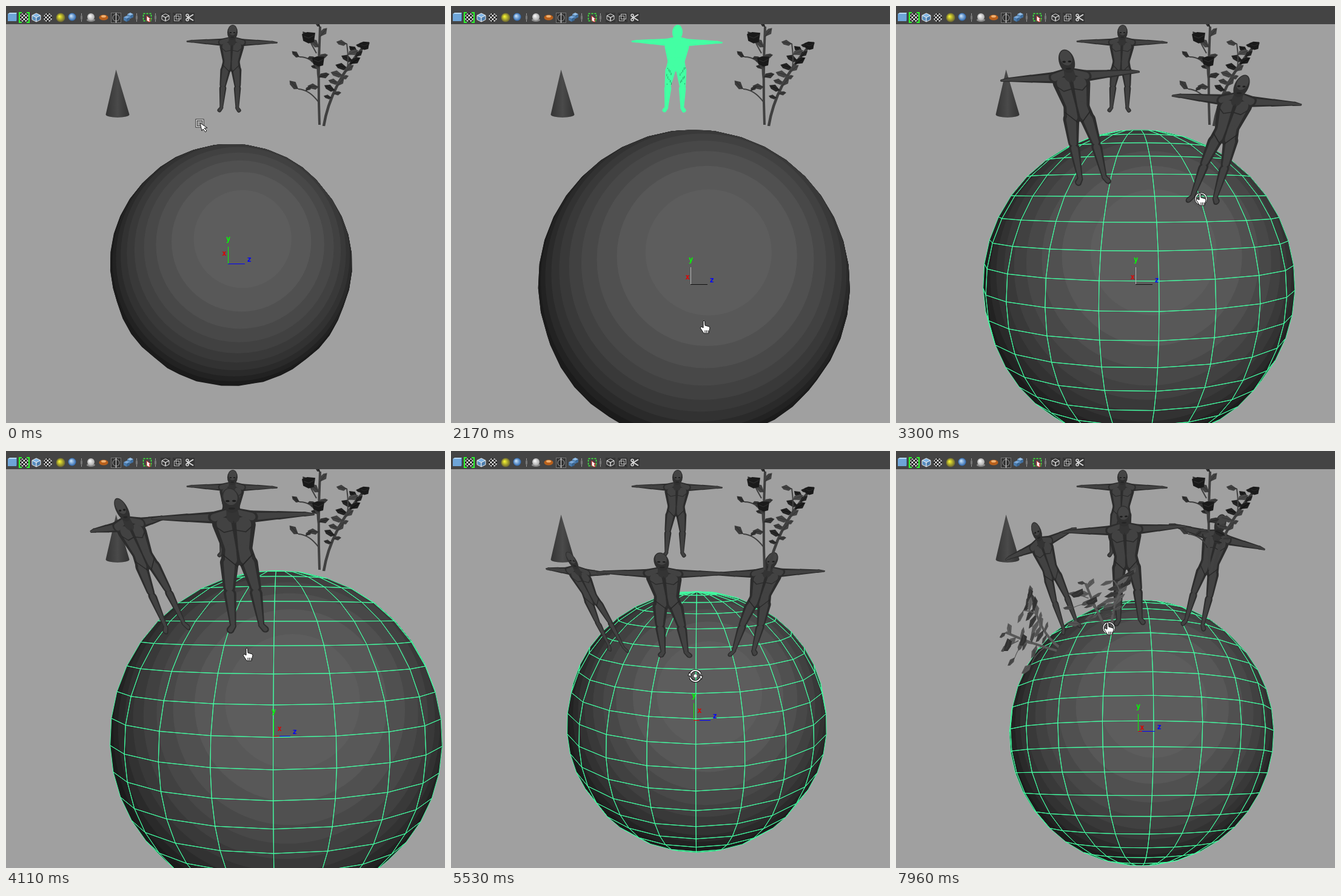
Recreate the animation shown at these times as an HTML page with a canvas. Size 724 by 688 pixels, loop 8 s.

```html
<!DOCTYPE html>
<html lang="en">
<head>
<meta charset="utf-8">
<title>Placing models on a sphere</title>
<style>
html, body { margin: 0; width: 100%; height: 100%; overflow: hidden; background: #a0a0a0; }
canvas { display: block; }
</style>
</head>
<body>
<canvas id="stage" width="724" height="688"></canvas>
<script>
const ctx = document.getElementById('stage').getContext('2d');
const LOOP = 8000, TAU = Math.PI * 2, RAD = Math.PI / 180;
const GREEN = '#43ffa3';

// ---------- story ----------
// Each view is reached by orbiting between start and end.
const VIEWS = [
  { start: -1, end: 0, x: 371, y: 427.5, radius: 200, tilt: 18, yaw: 8 },
  { start: 1620, end: 2150, x: 400, y: 462, radius: 258, tilt: 7.6, yaw: 6.1 },
  { start: 3480, end: 4060, x: 446, y: 472.5, radius: 275.5, tilt: 9, yaw: -18.9 },
  { start: 5130, end: 5520, x: 405.5, y: 447, radius: 215.5, tilt: 16.9, yaw: -18.4 },
  { start: 5520, end: 6200, x: 404, y: 465, radius: 219, tilt: -4.2, yaw: -13.6 }
];
// Each model is dragged over the sphere to lon/lat, starting off by `from`.
const LEFT = { start: 2250, end: 2760, lon: -25, lat: 41, from: [-20, -30] };
const MIDDLE = { start: 2960, end: 3440, lon: 8, lat: 41, from: [50, -36] };
const RIGHT = { start: 4550, end: 5000, lon: 41, lat: 41, from: [20, -36] };
const SPROUTS = [
  { start: 7100, end: 7500, lon: -27, lat: 31, from: [10, -25] },
  { start: 7680, end: 7940, lon: -1, lat: 37, from: [20, -25] }
];
const DRAGS = [LEFT, MIDDLE, RIGHT, ...SPROUTS];
const RESTS = [
  [0, 320, 193], [90, 320, 193], [300, 372, 100], [560, 578, 282], [840, 470, 270], [2170, 417, 519],
  [4110, 397, 325], [4400, 560, 600], [5530, 403, 371], [6380, 520, 160], [6640, 449, 292]
];

const within = (t, ...spans) => spans.some(([a, b]) => t >= a && t < b);
const mix = (a, b, p) => a + (b - a) * p;
function ease(t, start, end) {
  const p = Math.min(1, Math.max(0, (t - start) / (end - start)));
  return p * p * (3 - 2 * p);
}

// ---------- camera ----------
function cameraAt(t) {
  const cam = { ...VIEWS[0] };
  for (const view of VIEWS) {
    const p = ease(t, view.start, view.end);
    for (const key in cam) cam[key] = mix(cam[key], view[key], p);
  }
  return cam;
}
function project(cam, x, y, z) {
  const distance = 4.63, sin = Math.sin(cam.tilt * RAD), cos = Math.cos(cam.tilt * RAD);
  const scale = cam.radius * Math.sqrt(distance ** 2 - 1) / (distance - y * sin - z * cos);
  return [cam.x + x * scale, cam.y - (y * cos - z * sin) * scale];
}
function normalAt(lon, lat) {
  const l = lon * RAD, b = lat * RAD;
  return [Math.sin(l) * Math.cos(b), Math.sin(b), Math.cos(l) * Math.cos(b)];
}
function spotAt(item, cam, t) {
  const left = 1 - ease(t, item.start, item.end);
  return [item.lon + item.from[0] * left + cam.yaw, item.lat + item.from[1] * left];
}
function footAt(item, t) {
  const cam = cameraAt(t);
  return project(cam, ...normalAt(...spotAt(item, cam, t)));
}

const grip = (item, t) => footAt(item, t).map((v, i) => v - [4, 16][i]);
const PATH = [...RESTS, ...DRAGS.flatMap(d => [d.start, d.end].map(t => [t, ...grip(d, t)]))]
  .sort((a, b) => a[0] - b[0]);
function pointerAt(t) {
  const held = DRAGS.find(d => within(t, [d.start, d.end]));
  if (held) return grip(held, t);
  const i = PATH.findIndex(k => k[0] > t);
  if (i < 0) return PATH[PATH.length - 1].slice(1);
  const [a, b] = [PATH[i - 1], PATH[i]], p = ease(t, a[0], b[0]);
  return [mix(a[1], b[1], p), mix(a[2], b[2], p)];
}

// ---------- drawing helpers ----------
function poly(points, fill, stroke, width = 1, closed = true) {
  ctx.beginPath();
  points.forEach(([x, y]) => ctx.lineTo(x, y));
  if (closed) ctx.closePath();
  if (fill) { ctx.fillStyle = fill; ctx.fill(); }
  if (stroke) { ctx.strokeStyle = stroke; ctx.lineWidth = width; ctx.stroke(); }
}
const line = (color, width, ...points) => poly(points, null, color, width, false);
function oval(x, y, rx, ry, fill) {
  ctx.beginPath();
  ctx.ellipse(x, y, rx, ry, 0, 0, TAU);
  ctx.fillStyle = fill;
  ctx.fill();
}
function ring(x, y, r, color, width, from = 0, to = TAU) {
  ctx.beginPath();
  ctx.arc(x, y, r, from, to);
  ctx.strokeStyle = color;
  ctx.lineWidth = width;
  ctx.stroke();
}
function rect(x, y, w, h, fill) {
  ctx.fillStyle = fill;
  ctx.fillRect(x, y, w, h);
}
function frame(x, y, w, h, color, width = 1) {
  ctx.strokeStyle = color;
  ctx.lineWidth = width;
  ctx.strokeRect(x, y, w, h);
}
function placed(matrix, draw) {
  ctx.save();
  ctx.transform(...matrix);
  draw();
  ctx.restore();
}
function tapered(x1, y1, r1, x2, y2, r2, color) {
  const a = Math.atan2(y2 - y1, x2 - x1);
  ctx.beginPath();
  ctx.arc(x1, y1, r1, a + Math.PI / 2, a - Math.PI / 2);
  ctx.arc(x2, y2, r2, a - Math.PI / 2, a + Math.PI / 2);
  ctx.closePath();
  ctx.fillStyle = color;
  ctx.fill();
}
function seeded(seed) {
  return () => (seed = seed * 16807 % 2147483647) / 2147483647;
}

// ---------- man: mirrored tapered limbs, 143 units tall, arms 148 wide ----------
const ARM = [[17, 114, 6, 42, 114.5, 4], [42, 114.5, 4.2, 66, 115, 2.2], [66, 115, 2.4, 74, 114.5, 1.2]];
const TRUNK = [
  [4, 119, 4, 17, 114, 6], [9, 107, 11, 6, 83, 8], [6, 82, 8, 7, 72, 9],
  [9, 68, 8.5, 12, 44, 5.5], [12, 38, 5.8, 13, 8, 3], [13, 6, 3, 16, 2, 3.5]
];

function limbs(list, selected) {
  for (const [color, share] of selected ? [[GREEN, 1]] : [['#2d2d2d', 1], ['#424242', .62]]) {
    for (const side of [-1, 1]) {
      for (const [x1, y1, r1, x2, y2, r2] of list) {
        tapered(side * x1, y1, r1 * share, side * x2, y2, r2 * share, color);
      }
    }
  }
}
function man([fx, fy], [ux, uy], [ax, ay], selected) {
  // the trunk keeps some depth when the arms are foreshortened
  const deep = Math.max(1, .72 * Math.hypot(ux, uy) / Math.hypot(ax, ay));
  const up = [ux / 143, uy / 143, fx, fy];
  placed([ax / 148, ay / 148, ...up], () => limbs(ARM, selected));
  placed([ax / 148 * deep, ay / 148 * deep, ...up], () => {
    limbs(TRUNK, selected);
    tapered(0, 114, 6, 0, 124, 5, selected ? GREEN : '#343434');
    oval(0, 130.5, 8.5, 12.5, selected ? GREEN : '#303030');
    if (selected) {
      for (let i = 0; i < 34; i++) rect((i % 2 ? 1 : -1) * (7 + i * 7 % 9), 44 + i * 11 % 28, .8, 1.6, '#1d6b46');
      return;
    }
    oval(0, 134, 6.5, 8, '#444');
    oval(0, 122.5, 3, 1, '#252525');
    line('#2c2c2c', 1, [0, 110], [0, 72]);
    for (const s of [-1, 1]) {
      oval(s * 3, 130, 1.8, 1, '#1c1c1c');
      line('#2a2a2a', 1, [s, 101], [s * 10, 99], [s * 16, 104]);
      line('#262626', 1, [s * 14, 77], [s * 2, 65]);
    }
  });
}
function standingMan(item, cam, t) {
  if (t < item.start) return;
  const [lon, lat] = spotAt(item, cam, t), normal = normalAt(lon, lat);
  const lean = [normal[0], normal[1] + .7, normal[2]], size = Math.hypot(...lean);
  const turn = lon * 1.15 * RAD, across = [Math.cos(turn), 0, -Math.sin(turn)];
  const at = (height, side) =>
    project(cam, ...normal.map((v, i) => v + lean[i] / size * height + across[i] * side));
  const minus = (a, b) => [a[0] - b[0], a[1] - b[1]];
  const foot = at(0, 0);
  man(foot, minus(at(.73, 0), foot), minus(at(.58, .38), at(.58, -.38)));
}

// ---------- plant: curved stems with seeded leaves ----------
// base, bend, tip, width, leaves, bloom size at tip
const STEMS = [
  [[517, 196], [514, 120], [518, 34], 4, 7, 0],
  [[524, 198], [535, 130], [591, 66], 4.5, 15, 8],
  [[515, 158], [500, 138], [482, 137], 2, 2, 0],
  [[513, 104], [505, 84], [484, 84], 2, 2, 0],
  [[512, 78], [505, 66], [499, 53], 2, 1, 11],
  [[515, 120], [512, 105], [515, 92], 2, 1, 10],
  [[562, 108], [566, 90], [562, 62], 2, 2, 0]
];
function plant(selected, lift = 0, leafSize = 1) {
  const random = seeded(41), grey = level => selected ? GREEN : `rgb(${level},${level},${level})`;
  for (const [base, bend, tip, width, leaves, bloom] of STEMS) {
    ctx.beginPath();
    ctx.moveTo(...base);
    ctx.quadraticCurveTo(...bend, ...tip);
    ctx.strokeStyle = grey(64 + lift);
    ctx.lineWidth = width;
    ctx.stroke();
    for (let i = 0; i < leaves; i++) {
      const s = 1 - i / leaves * .7, q = 1 - s;
      const [x, y] = [0, 1].map(k => q * q * base[k] + 2 * q * s * bend[k] + s * s * tip[k]);
      const long = (8 + random() * 5) * leafSize, wide = long * .42, level = Math.round(28 + random() * 45 + lift);
      placed([1, 0, 0, 1, x, y], () => {
        ctx.rotate((i % 2 ? -1 : 1) * random() * .9 + (i % 2 ? 0 : Math.PI));
        poly([[0, 0], [long * .4, -wide], [long * 1.2, -wide * .8], [long * 1.6, 0], [long * .9, wide]], grey(level));
        line(grey(level - 14), 1, [0, 0], [long * 1.4, 0]);
      });
    }
    if (!bloom) continue;
    placed([bloom, 0, 0, bloom, ...tip], () => {
      poly([[-1, -.6], [-.2, -.9], [1, -.8], [.8, .6], [0, .8], [-.8, .4]], grey(26 + lift));
      line(grey(50 + lift), .1, [-.7, -.3], [0, 0], [.8, -.4]);
    });
  }
}
function sprout(item, cam, t) {
  if (t < item.start) return;
  placed([1, 0, 0, 1, ...footAt(item, t)], () => {
    ctx.rotate(spotAt(item, cam, t)[0] * 1.75 * RAD);
    ctx.scale(1, .55);
    ctx.translate(-520, -197);
    plant(false, 24, 1.35);
  });
}

function cone() {
  const shade = ctx.createLinearGradient(165, 0, 203, 0);
  shade.addColorStop(0, '#353535');
  shade.addColorStop(.5, '#4a4a4a');
  shade.addColorStop(1, '#333');
  ctx.beginPath();
  ctx.moveTo(181.5, 105);
  ctx.ellipse(184, 179, 19.5, 5, 0, 0, Math.PI);
  ctx.closePath();
  ctx.fillStyle = shade;
  ctx.fill();
}

function sphere(cam, wire, bandStep) {
  const { x, y, radius, yaw } = cam, mesh = new Path2D();
  const corner = (i, j) => project(cam, ...normalAt(i * 18 + yaw, j * 9 - 90));
  for (let i = 0; i < 20; i++) {
    for (let j = 0; j < 20; j++) {
      const [a, b, c, d] = [corner(i, j), corner(i + 1, j), corner(i + 1, j + 1), corner(i, j + 1)];
      const facing = (c[0] - a[0]) * (d[1] - b[1]) - (c[1] - a[1]) * (d[0] - b[0]);
      if (facing >= 0) continue;
      mesh.moveTo(...a);
      for (const p of [b, c, d]) mesh.lineTo(...p);
      mesh.closePath();
    }
  }
  ctx.save();
  ctx.clip(mesh);
  rect(0, 0, 724, 688, '#181818');
  // rings of equal light around a lamp slightly above and right of the viewer
  const cuts = [];
  for (let c = .915; c > 0; c -= bandStep) cuts.unshift(c);
  for (const c of cuts) {
    const level = Math.round(20 + 78 * Math.min(.94, c + bandStep / 2)), r = radius * Math.sqrt(1 - c * c);
    oval(x + .105 * radius * c, y - .235 * radius * c, r, r, `rgb(${level},${level},${level})`);
  }
  ctx.restore();
  if (wire) {
    ctx.strokeStyle = GREEN;
    ctx.lineWidth = 1;
    ctx.stroke(mesh);
  }
}

function axes(cam, muted) {
  const x = Math.round(cam.x - 5), y = Math.round(cam.y - 3);
  const lx = -.6 * cam.yaw - 1.3, ly = -8 - cam.tilt / 2;
  line(muted ? '#b5b5b5' : '#0f0', 1, [x + .5, y], [x + .5, y - 28]);
  line(muted ? '#111' : '#00f', 1, [x, y + .5], [x + 28, y + .5]);
  if (lx > 0) line('#e00000', 1, [x, y + .5], [x + lx, y + .5]);
  ctx.font = 'bold 12px "DejaVu Sans Mono", monospace';
  ctx.textAlign = 'center';
  for (const [text, color, tx, ty] of [
    ['y', '#0f0', x + .5, y - 37], ['z', '#00f', x + 35, y - 3], ['x', '#e00000', x + lx, y + ly + 4]
  ]) {
    ctx.fillStyle = color;
    ctx.fillText(text, tx, ty);
  }
}

function manipulator(x, y) {
  placed([1, 0, 0, 1, x, y], () => {
    line('#e00000', 1, [-10, -4], [-54, -21]);
    line('#00c', 1, [10, -1], [75, -10]);
    line('#00c000', 1, [2, -10], [9, -90]);
    poly([[-63, -25], [-47, -25], [-51, -17]], '#d00000');
    poly([[88, -13], [69, -15], [73, -5]], '#0000b0');
    poly([[11, -114], [4, -91], [15, -91]], '#00b400');
    poly([[-38, -91], [-27, -87], [-28, -72], [-39, -75]], '#0000c880', '#0000b0');
    poly([[56, -80], [70, -83], [69, -68], [55, -65]], '#ff303060', '#c02020');
    poly([[5, -23], [16, -26], [24, -23], [15, -20]], null, '#00b400');
    frame(-10, -10, 20, 20, '#ff0', 1.5);
  });
}

// ---------- interface ----------
function cube(x, y, s, top, left, right, edge) {
  const h = s * .5;
  poly([[x - s, y - h], [x, y - s], [x + s, y - h], [x, y]], top, edge);
  poly([[x - s, y - h], [x, y], [x, y + s], [x - s, y + h]], left, edge);
  poly([[x + s, y - h], [x, y], [x, y + s], [x + s, y + h]], right, edge);
}
function ball(x, y, r, light, dark) {
  const glow = ctx.createRadialGradient(x - 2, y - 2, 0, x, y, r);
  glow.addColorStop(0, light);
  glow.addColorStop(1, dark);
  oval(x, y, r, r, glow);
}
function checker(x, y) {
  ctx.save();
  ctx.beginPath();
  ctx.arc(x, y, 7, 0, TAU);
  ctx.clip();
  for (let i = 0; i < 25; i++) {
    rect(x - 7.5 + i % 5 * 3, y - 7.5 + Math.floor(i / 5) * 3, 3, 3, i % 2 ? '#eee' : '#111');
  }
  ctx.restore();
}
function toolbar() {
  rect(0, 0, 724, 30, '#444');
  rect(3, 13, 14, 12, '#6ea5d8');
  poly([[3, 13], [6, 11], [18, 11], [17, 13]], '#b5d7f2');
  poly([[17, 13], [18, 11], [18, 23], [17, 25]], '#3f74a8');
  checker(30, 19);
  for (const s of [-1, 1]) line('#2dff2d', 2, [30 + s * 4, 11], [30 + s * 8, 11], [30 + s * 8, 27], [30 + s * 4, 27]);
  cube(50, 19, 7, '#7fb5e5', '#5a8fc0', '#4a7bab', '#eee');
  checker(69, 19);
  ball(90, 19, 7.5, '#ffff30', '#6a6430');
  ball(109, 18, 6.5, '#d5ecff', '#2c66ad');
  for (const x of [124.5, 215.5, 246.5]) {
    line('#999', 1, [x, 12], [x, 26]);
    oval(x, 19, 1.6, 4, '#777');
  }
  oval(140, 23, 7, 3, '#888');
  ball(140, 18, 6, '#fff', '#aaa');
  oval(161, 19, 7.5, 4.5, '#b8601c');
  oval(161, 17, 4, 2, '#f0b070');
  rect(173, 11, 16, 16, '#333');
  frame(173.5, 11.5, 16, 16, '#777');
  ring(181.5, 19.5, 5.5, '#aaa', 1);
  line('#ddd', 1, [181.5, 11], [181.5, 28]);
  cube(205, 16, 5, '#94bfe8', '#5888b8', '#3f6d9d');
  cube(199, 21, 5, '#7baadb', '#4b7db0', '#396592');
  ctx.setLineDash([3, 2]);
  frame(226.5, 12.5, 13, 12, '#3dff3d', 1.5);
  ctx.setLineDash([]);
  poly([[232, 16], [239, 22], [236, 22], [238, 26], [235, 26], [232, 24]], '#fff', '#c22');
  for (const x of [263, 283, 303]) rect(x - 8, 11, 16, 16, '#363636');
  cube(263, 19, 6, null, null, null, '#ddd');
  frame(277.5, 16.5, 8, 8, '#bbb');
  frame(280.5, 13.5, 8, 8, '#bbb');
  for (const s of [-1, 1]) {
    line('#ddd', 2, [309, 19 + s * 5], [299, 19 - s]);
    ring(299, 19 + s * 3.5, 2, '#ddd', 1.5);
  }
}

function pointer(t) {
  const pressed = DRAGS.some(d => within(t, [d.start, d.end])) || t > 7680;
  const orbiting = VIEWS.some(v => within(t, [v.start, v.end]));
  placed([1, 0, 0, 1, ...pointerAt(t).map(Math.round)], () => {
    if (orbiting) {
      for (const [color, width] of [['#111', 4], ['#fff', 2]]) {
        ring(0, 0, 9, color, width, .3, 2.8);
        ring(0, 0, 9, color, width, 3.45, 5.9);
      }
      poly([[-12, 0], [-6, 0], [-10, -6]], '#fff', '#111');
      poly([[12, 0], [6, 0], [10, 6]], '#fff', '#111');
      oval(0, 0, 2.5, 2.5, '#fff');
    } else if (within(t, [0, 1200], [6200, 6850])) {
      frame(-6, -5, 11, 11, '#111', 3);
      frame(-6, -5, 11, 11, '#fff', 1.3);
      poly([[0, 0], [12, 8], [7, 8.5], [11, 13], [9, 15], [5, 10], [3, 13]], '#fff', '#111');
    } else {
      if (pressed) {
        ring(2, 10, 9, '#111', 3);
        ring(2, 10, 9, '#fff', 1.5);
      }
      poly([[-1, 1], [0, 0], [1.5, 1], [2, 8], [9, 10], [10, 12], [8, 21], [0, 21], [-6, 12], [-4, 10], [-1, 12]],
        '#fff', '#111');
      for (const x of [2, 4.5, 7]) line('#111', 1, [x, 16], [x, 20]);
    }
  });
}

// ---------- scene ----------
function draw(t) {
  const cam = cameraAt(t);
  rect(0, 0, 724, 688, '#a0a0a0');
  cone();
  man([368, 174], [6, -143], [148, 2], within(t, [300, 2250]));
  sphere(cam, within(t, [2250, 6300], [7100, LOOP]), within(t, [5990, 7100]) ? .195 : .0975);
  standingMan(RIGHT, cam, t);
  plant(within(t, [6380, 7100]));
  standingMan(LEFT, cam, t);
  standingMan(MIDDLE, cam, t);
  for (const item of SPROUTS) sprout(item, cam, t);
  axes(cam, within(t, [2100, 3500]));
  if (within(t, [300, 920])) manipulator(368, 173);
  if (within(t, [6380, 6880])) manipulator(523, 198);
  toolbar();
  pointer(t);
}

function tick(now) {
  draw(now % LOOP);
  requestAnimationFrame(tick);
}
draw(0);
requestAnimationFrame(tick);
</script>
</body>
</html>
```
